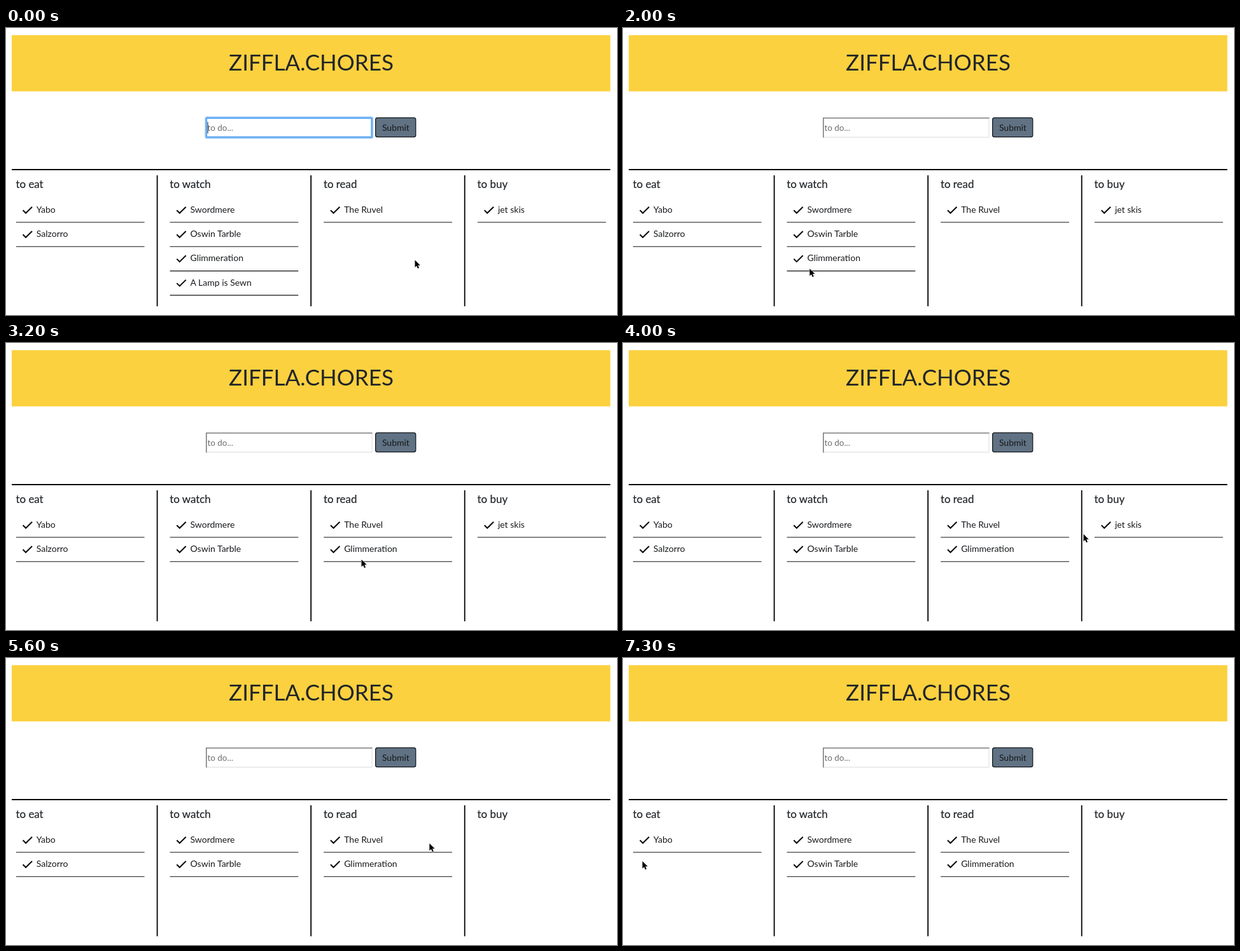
Recreate the animation shown at these times as an HTML page. Size 960x452 px, loop 7.4 s.

```html
<!DOCTYPE html>
<html lang="en">
<head>
<meta charset="utf-8">
<title>To-do board</title>
<style>
  html, body { margin: 0; width: 100%; height: 100%; overflow: hidden; background: #fff; }
  svg { display: block; width: 100vw; height: 100vh; }
  text { font-family: Lato, "Open Sans", sans-serif; font-size: 14px; fill: #17191c; }
  .title { font-size: 35px; fill: #212529; text-anchor: middle; }
  .head { font-size: 16.9px; fill: #212529; stroke: #212529; stroke-width: .2; }
  .hint { font-size: 13.4px; fill: #6d6d6d; }
  .check { fill: none; stroke: #0a0a0a; stroke-width: 2; }
  .ring { fill: none; stroke: #64aaf2; stroke-width: 2.4; }
  .halo { fill: none; stroke: #a9d2fa; stroke-width: 4; }
</style>
</head>
<body>
<svg id="stage" viewBox="0 0 960 452">
  <rect width="960" height="452" fill="#fff"/>
  <rect x="9" y="11.3" width="940.5" height="88.5" fill="#fcd13f"/>
  <text class="title" x="479.5" y="66.8">ZIFFLA.CHORES</text>

  <rect x="314" y="141" width="261.5" height="31.5" fill="#fff"/>
  <path d="M575 141V172H314" fill="none" stroke="#e6e6e6" stroke-width="1.4"/>
  <path d="M314.8 172.5V141.8H575.5" fill="none" stroke="#7d7d7d" stroke-width="1.6"/>
  <g id="focus">
    <rect class="halo" x="314.3" y="141.3" width="261" height="31.2" rx="1.5"/>
    <rect class="ring" x="314.8" y="141.8" width="260" height="30.2" rx="1"/>
  </g>
  <text class="hint" x="316.5" y="161.5">to do...</text>
  <path id="caret" d="M317 148V166" stroke="#222"/>

  <rect x="580.6" y="141.3" width="63.2" height="30.4" rx="3" fill="#607283" stroke="#0c1116" stroke-width="1.2"/>
  <text x="612.4" y="161.5" text-anchor="middle">Submit</text>

  <path d="M9 223H949.5M237.6 232V438.3M479.2 232V438.3M720.7 232V438.3" stroke="#000" stroke-width="1.8"/>
  <g id="board"></g>
  <path id="cursor" d="M0 0V11.4L2.6 9L4.5 13.2L6.5 12.3L4.7 8.3H8.3Z" fill="#000" stroke="#fff" stroke-width="1"
    paint-order="stroke" stroke-linejoin="round"/>
</svg>
<script>
const LOOP = 7400, STEP = 100;
const COL = 241.7, ROW = 38.3;
const $ = id => document.getElementById(id);
const show = (el, on) => el.setAttribute('visibility', on ? 'inherit' : 'hidden');
const place = (el, x, y) => el.setAttribute('transform', `translate(${x} ${y})`);

const columns = [
  ['to eat', 'Yabo', 'Salzorro'],
  ['to watch', 'Swordmere', 'Oswin Tarble', 'Glimmeration', 'A Lamp is Sewn'],
  ['to read', 'The Ruvel'],
  ['to buy', 'jet skis']
];

const itemMarkup = (label, c, r) => `
  <g id="i${c}${r}" transform="translate(${15.8 + c * COL} ${286.5 + r * ROW})">
    <g class="box" visibility="hidden">
      <rect class="halo" x="7.8" y="-10.8" width="21.4" height="22.6" rx="2"/>
      <rect class="ring" x="8" y="-10.6" width="21" height="22.2" rx="1.5"/>
    </g>
    <path class="check" d="M10.8 .5L15.3 5L25.2 -4.8"/>
    <text x="32" y="4.3">${label}</text>
    <path d="M0 19.5H201.8" stroke="#111" stroke-width="1.1"/>
  </g>`;

$('board').innerHTML = columns.map(([head, ...items], c) =>
  `<text class="head" x="${15.5 + c * COL}" y="251.5">${head}</text>` +
  items.map((label, r) => itemMarkup(label, c, r)).join('')).join('');

// Items ticked off: hover, press and removal times
const ticks = [
  { id: 'i13', hover: 1100, press: 1500, gone: 1700 },
  { id: 'i30', hover: 4600, press: 4900, gone: 5200 },
  { id: 'i01', hover: 6300, press: 6700, gone: 7000 }
].map(k => {
  const el = $(k.id);
  return { ...k, el, box: el.querySelector('.box'), check: el.querySelector('.check') };
});

// Pointer path: time, x, y
const path = [
  [0, 642.5, 365.5], [200, 642.5, 365.5], [1100, 272.5, 397], [1800, 272.5, 397],
  [2200, 314, 361], [2400, 314, 361], [2700, 558.5, 341], [3400, 558.5, 341],
  [4000, 723.5, 301], [4600, 757, 288], [5400, 757, 288], [6300, 30.5, 320], [7400, 30.5, 320]
];
const drag = { el: $('i12'), start: 2400, drop: 2900, end: 3200, x: 314, y: 361 };

const ease = u => u * u * (3 - 2 * u);
const mix = (a, b, u) => a + (b - a) * u;

function pointer(t) {
  const i = path.findIndex(p => p[0] > t);
  const a = path[i - 1], b = path[i];
  const u = ease((t - a[0]) / (b[0] - a[0]));
  return [mix(a[1], b[1], u), mix(a[2], b[2], u)];
}

function dragOffset(t, x, y) {
  if (t < drag.start) return [0, 0];
  const u = Math.min(1, Math.max(0, (t - drag.drop) / (drag.end - drag.drop)));
  const k = 1 - (1 - u) ** 3;
  return [mix(x - drag.x, COL, k), mix(y - drag.y, -ROW, k)];
}

function draw(t) {
  const [x, y] = pointer(t);
  place($('cursor'), x, y);
  show($('focus'), t < 1500);
  show($('caret'), t < 700 || (t >= 1300 && t < 1500));

  for (const k of ticks) {
    show(k.el, t < k.gone);
    show(k.box, t >= k.press && t < k.gone);
    k.check.style.stroke = t >= k.hover ? '#fcd13f' : '';
  }

  const [dx, dy] = t < drag.end ? dragOffset(t, x, y) : [COL, -ROW];
  place(drag.el, 15.8 + COL + dx, 286.5 + 2 * ROW + dy);
}

function tick() {
  draw(Math.floor(performance.now() % LOOP / STEP) * STEP);
  requestAnimationFrame(tick);
}
tick();
</script>
</body>
</html>
```
